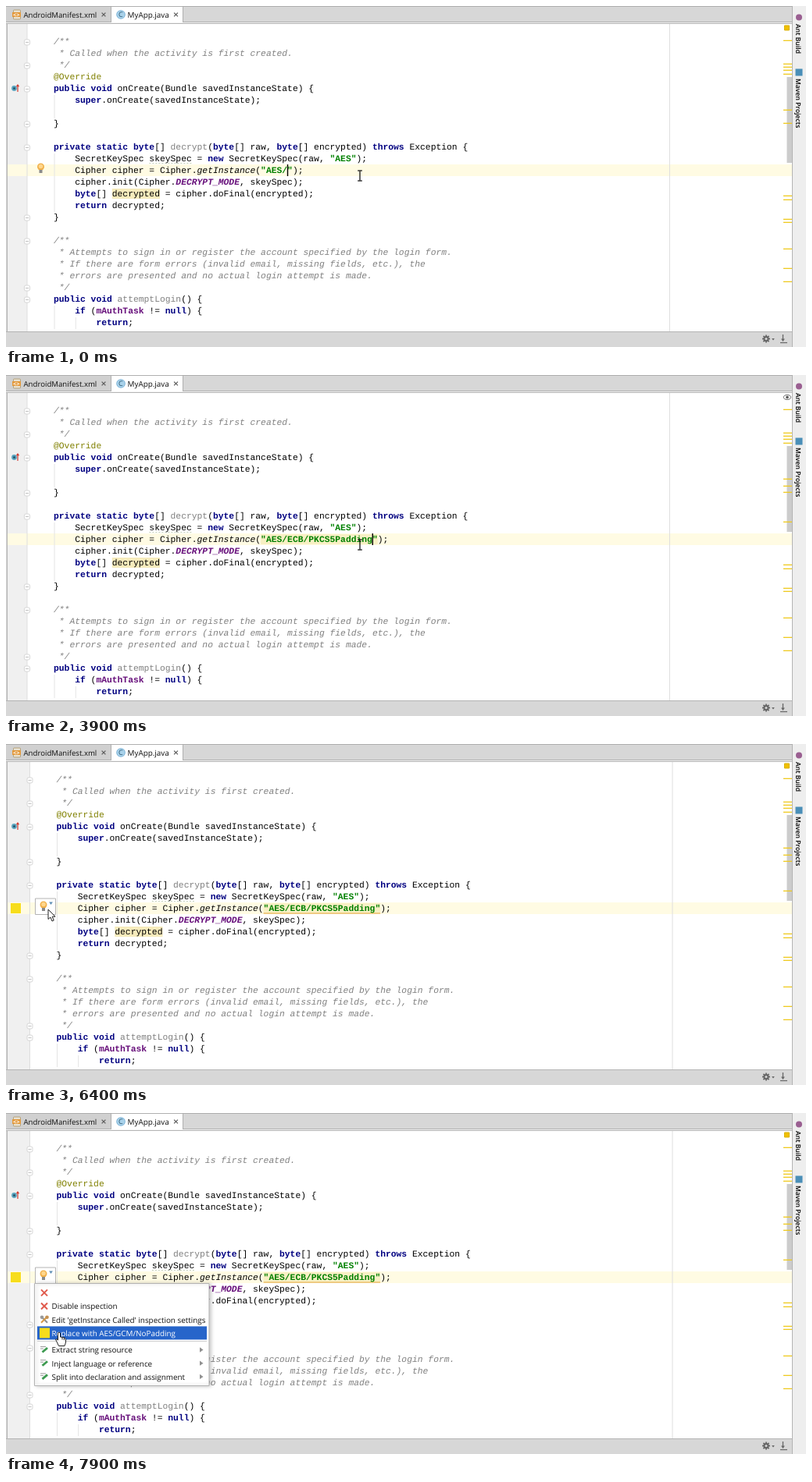
Animation, 1024 px wide and 437 px high, one loop 8 s. Source, as an HTML page with a canvas:

```html
<!DOCTYPE html>
<html lang="en">
<head>
<meta charset="utf-8">
<title>Code editor</title>
<style>
html, body { margin: 0; width: 100%; height: 100%; overflow: hidden; background: #fff; }
canvas { display: block; width: 1024px; height: 437px; }
</style>
</head>
<body>
<canvas id="stage"></canvas>
<script>
const W = 1024, H = 437, LOOP = 8000;
const canvas = document.getElementById('stage');
const c = canvas.getContext('2d');
const dpr = window.devicePixelRatio || 1;
canvas.width = W * dpr;
canvas.height = H * dpr;
c.textRendering = 'geometricPrecision';

const MONO = '11.33px "Liberation Mono", "Courier New", monospace';
const UI = '"Open Sans", "Noto Sans", sans-serif';
const BAR = '#d7d7d7', EDGE = '#b4b4b4', YELLOW = '#f7dd1c';
const LINE = 15, TOP = 46, ROW_Y = 203, INDENT = 4;

// moments of the story, in ms
const TYPE = 100, INSPECTED = 4200, BULB = 4700, MOVE = 5400, HOVER = 6300, MENU_OPEN = 6600, PICK = 6900;

const CIPHER = 'AES/ECB/PKCS5Padding';
const CALL = '    Cipher cipher = Cipher.getInstance(';
const CODE = `/**
 * Called when the activity is first created.
 */
@Override
public void onCreate(Bundle savedInstanceState) {
    super.onCreate(savedInstanceState);

}

private static byte[] decrypt(byte[] raw, byte[] encrypted) throws Exception {
    SecretKeySpec skeySpec = new SecretKeySpec(raw, "AES");
${CALL}"${CIPHER}");
    cipher.init(Cipher.DECRYPT_MODE, skeySpec);
    byte[] decrypted = cipher.doFinal(encrypted);
    return decrypted;
}

/**
 * Attempts to sign in or register the account specified by the login form.
 * If there are form errors (invalid email, missing fields, etc.), the
 * errors are presented and no actual login attempt is made.
 */
public void attemptLogin() {
    if (mAuthTask != null) {
        return;`.split('\n');

const STYLES = [
  [/^"[^"]*"/, '#008000', 'bold '],
  [/^(public|private|static|void|byte|new|return|if|null|throws|super)\b/, '#000080', 'bold '],
  [/^DECRYPT_MODE/, '#660e7a', 'italic bold '],
  [/^mAuthTask/, '#660e7a', 'bold '],
  [/^getInstance/, '#000', 'italic '],
  [/^@Override/, '#808000', ''],
  [/^(decrypt|attemptLogin)\b/, '#808080', ''],
  [/^(\w+|[^\w"]+?(?=[\w"]|$))/, '#000', '']
];

const MENU = ['', 'Disable inspection', "Edit 'getInstance Called' inspection settings",
  'Replace with AES/GCM/NoPadding', 'Extract string resource',
  'Inject language or reference', 'Split into declaration and assignment'];

const mix = (a, b, u) => a + (b - a) * u;
const clamp = (v, lo, hi) => Math.min(hi, Math.max(lo, v));
const smooth = u => u * u * (3 - 2 * u);

// characters typed so far: a first burst, then a steady pace
function typed(t) {
  if (t < 1000) return 4 + [TYPE, 200, 500, 600].filter(k => k <= t).length;
  return Math.min(CIPHER.length, 10 + Math.floor((t - 1100) / 280));
}

// the analysis switches on and off at these times
const busy = t => [TYPE, 500, 600, 1300, 1700, 2600, 2700, INSPECTED].filter(k => k <= t).length % 2;

function rect(x, y, w, h, color) {
  c.fillStyle = color;
  c.fillRect(x, y, w, h);
}

function box(x, y, w, h, r, fill, stroke) {
  c.beginPath();
  c.roundRect(x, y, w, h, r);
  c.fillStyle = fill;
  c.fill();
  c.strokeStyle = stroke;
  c.lineWidth = 1;
  c.stroke();
}

function line(color, width, x1, y1, x2, y2) {
  c.strokeStyle = color;
  c.lineWidth = width;
  c.beginPath();
  c.moveTo(x1, y1);
  c.lineTo(x2, y2);
  c.stroke();
}

function disc(x, y, r, color) {
  c.fillStyle = color;
  c.beginPath();
  c.arc(x, y, r, 0, 7);
  c.fill();
}

// filled triangle with its tip at x, y, pointing along the angle a
function wedge(x, y, size, a, color) {
  c.save();
  c.translate(x, y);
  c.rotate(a);
  c.beginPath();
  c.moveTo(0, 0);
  c.lineTo(-size, -size * 0.7);
  c.lineTo(-size, size * 0.7);
  c.fillStyle = color;
  c.fill();
  c.restore();
}

function label(text, x, y, size, color = '#111', weight = '') {
  c.font = weight + size + 'px ' + UI;
  c.fillStyle = color;
  c.fillText(text, x, y);
}

function cross(x, y, r, color, width) {
  for (const d of [-r, r]) line(color, width, x - r, y - d, x + r, y + d);
}

function sideLabel(text, y) {
  c.save();
  c.translate(1011, y);
  c.rotate(Math.PI / 2);
  label(text, 0, 0, 8.6, '#000', '600 ');
  c.restore();
}

function drawCodeLine(text, x, y, cw) {
  if (/^(\/\*| \*)/.test(text)) {
    c.font = 'italic ' + MONO;
    c.fillStyle = '#808080';
    c.fillText(text, x, y);
    return;
  }
  let col = 0;
  while (col < text.length) {
    const rest = text.slice(col);
    const [rule, color, face] = STYLES.find(s => s[0].test(rest));
    const word = rest.match(rule)[0];
    c.font = face + MONO;
    c.fillStyle = color;
    c.fillText(word, x + col * cw, y);
    col += word.length;
  }
}

function drawFold(x, y) {
  box(x - 3.5, y - 3.5, 7, 7, 2, '#fff', '#d6d6d6');
  line('#c0c0c0', 1, x - 2, y, x + 2, y);
}

function drawCode(x, fold, cw, n) {
  let depth = 0;
  CODE.forEach((text, i) => {
    const y = TOP + i * LINE;
    if (text === '}') depth--;
    for (let k = 0; k < depth; k++) {
      const gx = x + 1 + k * INDENT * cw;
      line('#e4e4e4', 1, gx, y - 7, gx, y + 8);
    }
    if (text.endsWith('{')) depth++;
    if (/^(\/\*\*| \*\/|}|p.*{$)/.test(text)) drawFold(fold, y + 0.5);
    drawCodeLine(text.replace(CIPHER, CIPHER.slice(0, n)), x, y + 3.4, cw);
  });
}

function drawBulb(x, y) {
  disc(x, y - 2, 4.5, '#f1b04a');
  disc(x, y - 2.5, 2.8, '#ffd68c');
  rect(x - 2, y + 2, 4, 4, '#8a8a8a');
}

function drawEditor(t) {
  const shift = t >= INSPECTED ? 3.5 : 0, n = typed(t);
  const x = 61 + shift, fold = 27 + shift, guide = 849.5 + shift;
  c.font = MONO;
  const cw = c.measureText('0').width;
  const quote = x + CALL.length * cw;

  rect(2, 23, fold - 2, 394, '#f0f0f0');
  rect(2, ROW_Y, 1004, LINE, '#fffbe3');
  line('#dedede', 1, fold, 23, fold, 417);
  line('#dedede', 1, guide, 23, guide, 417);

  if (t >= TYPE) rect(quote, ROW_Y + 1, (n + 2) * cw, 13, '#f8f0c4');
  rect(x + 11 * cw, ROW_Y + 31, 9 * cw, 13, '#f6ebbc');
  if (shift) line('#e0a030', 1, quote, 217, quote + (n + 2) * cw, 217);
  c.setLineDash([2, 2]);
  line('#c3cfb0', 1, x + 18 * cw, 201.5, x + 26 * cw, 201.5);
  c.setLineDash([]);
  drawCode(x, fold, cw, n);

  disc(10.5, 105.5, 3.4, '#5aa5be');
  disc(10.5, 105.5, 1.5, '#28536b');
  line('#d03a30', 1.2, 15, 110, 15, 102);
  wedge(15, 100, 3.2, -Math.PI / 2, '#d03a30');
  if (shift) rect(6, 204, 13, 13, YELLOW);

  if (t < HOVER) rect(quote + (n + 1) * cw - 0.3, ROW_Y, 1.4, LINE, '#000');
  if (t < TYPE || (t >= BULB && t < HOVER)) drawBulb(44.5 + shift, 208);
}

function drawStripe(t) {
  rect(999.5, 91, 6.5, 110, '#cccccc');
  const marks = [44, 87, 133, 150, 243, 248, 273, 277, 311, 336, 353];
  for (let y = 74; y < 84; y += 4) marks.push(y);
  if (t >= TYPE) marks.push(142, 188);
  for (const y of marks) rect(995, y - 0.3, 11, 1.3, '#efca20');
  if (busy(t)) {
    c.strokeStyle = '#666';
    c.lineWidth = 1;
    c.beginPath();
    c.ellipse(1000, 28.5, 4.6, 2.9, 0, 0, 7);
    c.stroke();
    disc(1000, 28.5, 1.8, '#555');
  } else {
    box(996.5, 25, 6, 6, 0, '#f0c000', '#d9b000');
  }
}

function drawTabs() {
  rect(0, 0, 1006, 22, BAR);
  rect(0, 1, 134, 19, '#d0d0d0');
  line('#b0b0b0', 1, 0, 0.5, 1006, 0.5);
  line('#b0b0b0', 1, 0, 20.5, 1006, 20.5);
  rect(135, 1, 91, 20, '#fff');
  for (const x of [134.5, 226.5]) line('#b0b0b0', 1, x, 1, x, 20);
  rect(0, 21, 1006, 1, '#f6f6f6');
  line(EDGE, 1, 0, 22.5, 1006, 22.5);

  box(9.5, 5, 9, 12, 1, '#e9e1d0', '#b5a37d');
  rect(8, 8, 11, 6, '#e39a3d');
  label('<>', 9, 13.6, 7.5, '#fff', 'bold ');
  label('AndroidManifest.xml', 22.5, 15, 9.65);
  disc(147, 11, 5.8, '#7db4d8');
  disc(147, 11, 4.8, '#a9d2ea');
  label('C', 144, 14.3, 9, '#26536e');
  label('MyApp.java', 155.5, 15, 9.9);
  for (const x of [125, 217.5]) cross(x, 11, 2.4, '#606060', 1.3);
}

function drawGear(x, y) {
  for (let a = 0; a < Math.PI; a += Math.PI / 4) {
    const dx = 5 * Math.cos(a), dy = 5 * Math.sin(a);
    line('#666', 1.8, x - dx, y - dy, x + dx, y + dy);
  }
  disc(x, y, 3.6, '#666');
  disc(x, y, 1.5, BAR);
}

function drawBars() {
  rect(0, 23, 1.5, 394, BAR);
  line(EDGE, 1, 1.5, 23, 1.5, 417);
  rect(0, 417, 1006, 20, BAR);
  line(EDGE, 1, 0, 417.5, 1006, 417.5);
  rect(1006, 0, 18, H, '#eeeeee');
  line(EDGE, 1, 1006.5, 0, 1006.5, H);

  disc(1015, 14.5, 4, '#9a5f91');
  sideLabel('Ant Build', 23);
  rect(1010.5, 80.5, 9, 9, '#4a8fb8');
  sideLabel('Maven Projects', 93);

  drawGear(973, 426.5);
  wedge(982, 428.5, 2.6, Math.PI / 2, '#666');
  line('#666', 1.3, 994.5, 421, 994.5, 428);
  wedge(994.5, 430, 3.4, Math.PI / 2, '#666');
  line('#666', 1.2, 991, 431.5, 1000, 431.5);
}

function drawBulbBox() {
  box(37.5, 198, 26, 20.5, 0, '#fff', EDGE);
  drawBulb(48, 208);
  wedge(57.5, 206, 3.4, Math.PI / 2, '#5f8fb5');
}

function drawItemIcon(i, y) {
  if (i < 2) cross(49, y, 4, '#e05a4c', 1.9);
  else if (i === 2) {
    line('#8c8c8c', 2, 45, y - 4, 53, y + 4);
    line('#d79a45', 2, 45, y + 4, 53, y - 4);
    disc(46, y - 3, 2.3, '#999');
    disc(52.5, y - 3, 2.3, '#c69150');
  } else if (i === 3) rect(43, y - 6.5, 13, 13, YELLOW);
  else {
    line('#999', 1, 44, y - 4, 51, y - 4);
    line('#999', 1, 44, y - 1.5, 48, y - 1.5);
    line('#3d9a50', 2.8, 46.5, y + 3, 53, y - 2.5);
    wedge(252.5, y, 4.5, 0, '#909090');
  }
}

function drawMenu(active) {
  c.save();
  c.shadowColor = 'rgba(0,0,0,.25)';
  c.shadowBlur = 5 * dpr;
  c.shadowOffsetX = 2 * dpr;
  box(36.5, 218.5, 223.5, 131, 0, '#fff', EDGE);
  c.restore();
  line('#cfcfcf', 1, 40, 292.5, 257, 292.5);
  MENU.forEach((text, i) => {
    const y = 230.3 + i * 17.2 + (i > 3 ? 4.4 : 0);
    if (i === active) rect(40, y - 8.5, 217, 17, '#2765ca');
    drawItemIcon(i, y);
    label(text, 58.5, y + 3.8, 9.9, i === active ? '#fff' : '#111');
  });
}

function drawBeam(x, y) {
  line('#000', 1.2, x, y - 6, x, y + 6);
  for (const d of [-6.5, 6.5]) line('#000', 1.2, x - 2.8, y + d, x + 2.8, y + d);
}

function drawPath(x, y, d) {
  c.save();
  c.translate(x, y);
  const p = new Path2D(d);
  c.fillStyle = '#fff';
  c.fill(p);
  c.strokeStyle = '#222';
  c.lineWidth = 1;
  c.stroke(p);
  c.restore();
}

const drawArrow = (x, y) => drawPath(x, y, 'M0 0v12.5l2.9-2.5 2.1 5 2.2-1-2-4.8H9z');
const drawHand = (x, y) => drawPath(x, y,
  'M-1.5 10V1q1.5-2 3 0v5l5 .7 2 1.8V13L7 17.5H-.5L-4.5 9q1.5-1 3 1M4 6.5v3M6.4 7v3');

function drawMouse(t, hand) {
  if (t < MOVE) {
    const [x, y] = t < BULB ? [453, 217.5] : [473.5, 219];
    drawBeam(x, y);
  } else if (t < HOVER) {
    const u = (t - MOVE + 100) / 900;
    const x = mix(473.5, 56, smooth(u)), y = mix(219, 216, u) + 28 * Math.sin(Math.PI * u);
    (u < 1 ? drawBeam : drawArrow)(x, y);
  } else if (t < PICK) drawArrow(54, 212);
  else drawHand(...hand);
}

function draw(now) {
  const t = Math.floor((now % LOOP) / 100) * 100;
  c.setTransform(dpr, 0, 0, dpr, 0, 0);
  rect(0, 0, W, H, '#fff');
  drawEditor(t);
  drawStripe(t);
  drawTabs();
  drawBars();

  const u = clamp((t - PICK + 100) / 1100, 0, 1);
  const hand = [56 + 12 * Math.sin(Math.PI / 2 * Math.min(1, u * 2)), mix(220, 281, Math.pow(u, 0.75))];
  if (t >= HOVER) drawBulbBox();
  if (t >= MENU_OPEN) drawMenu(clamp(Math.floor((hand[1] - 222) / 17.2), 0, 3));
  drawMouse(t, hand);
}

let start = null;
function tick(now) {
  if (start === null) start = now;
  draw(now - start);
  requestAnimationFrame(tick);
}
draw(0);
requestAnimationFrame(tick);
</script>
</body>
</html>
```
